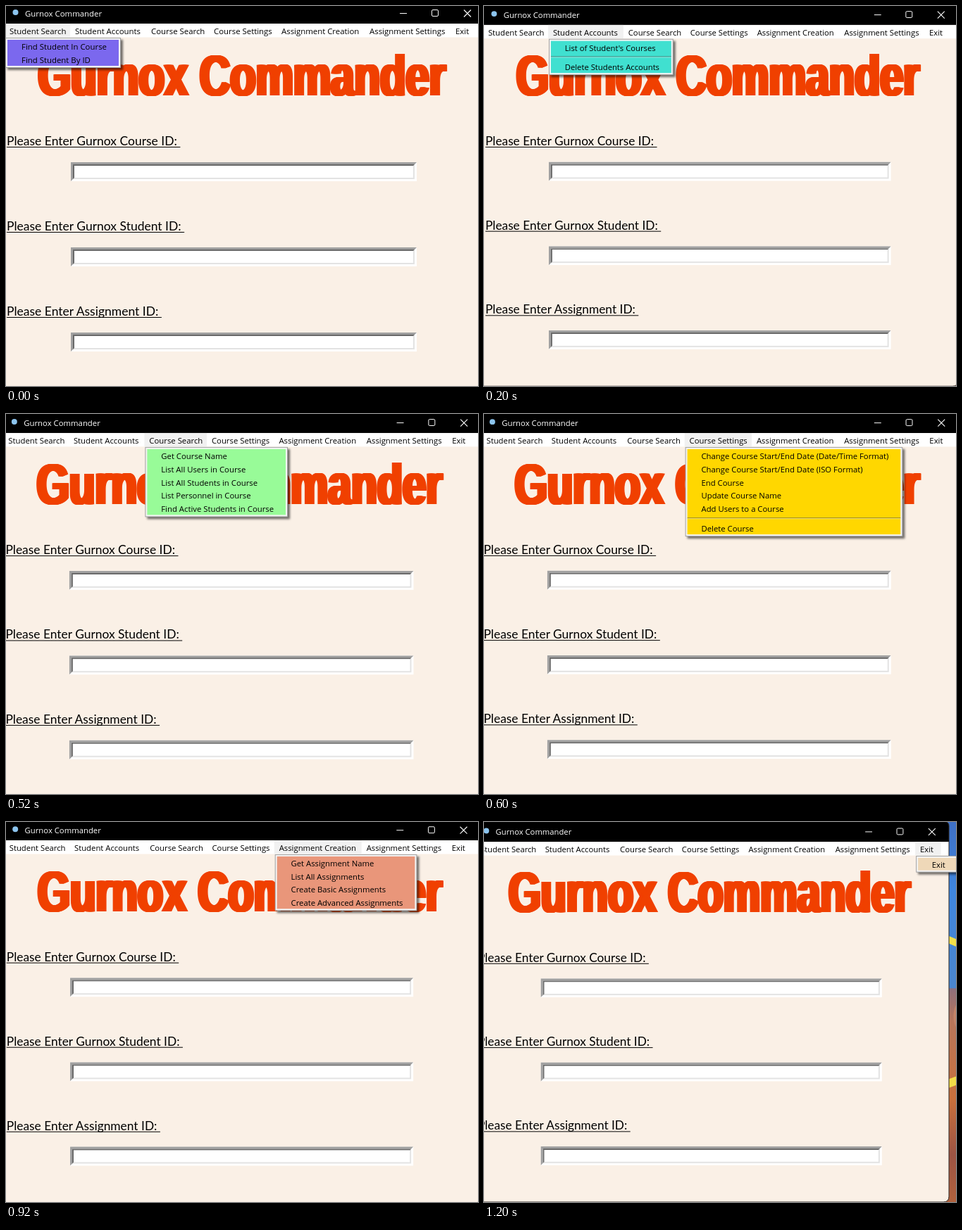
Recreate the animation shown at these times as an HTML page. Size 670 by 540 pixels, loop 1.4 s.

```html
<!DOCTYPE html>
<html lang="en">
<head>
<meta charset="utf-8">
<title>Gurnox Commander</title>
<style>
  html, body { margin: 0; width: 100%; height: 100%; overflow: hidden; background: #faf0e6; }
  svg { display: block; width: 670px; height: 540px; overflow: hidden; }
  text { white-space: pre; }
  .ui { font: 11.4px "Open Sans", "Noto Sans", sans-serif; }
  .label { font: 17.5px Lato, "Open Sans", sans-serif; }
  .headline { font: bold 82px "Liberation Sans", Arial, sans-serif; fill: #f04000; }
  .shadow { filter: drop-shadow(3px 3px 1.5px rgba(0, 0, 0, .55)); }
</style>
</head>
<body>
<svg id="stage" viewBox="0 0 670 540">
  <defs>
    <linearGradient id="sky" x2="0" y2="1">
      <stop offset="0" stop-color="#3f6fc4"/>
      <stop offset=".4" stop-color="#3f86de"/>
      <stop offset="1" stop-color="#4c86cc"/>
    </linearGradient>
    <linearGradient id="ground" x2="0" y2="1">
      <stop offset="0" stop-color="#8e6f7c"/>
      <stop offset=".15" stop-color="#b8765a"/>
      <stop offset=".5" stop-color="#c8703c"/>
      <stop offset=".75" stop-color="#9c5444"/>
      <stop offset="1" stop-color="#b4643c"/>
    </linearGradient>
    <path id="frame" d="M-4-4H673.5q6 0 6 6V536q0 8-8 8H-4z"/>
    <clipPath id="inside"><use href="#frame"/></clipPath>
    <text id="headline" class="headline">Gurnox Commander</text>
  </defs>
</svg>
<script>
const stage = document.getElementById('stage');
const STEP = 200;
const APP = 'Gurnox Commander';

// '-' is a separator line; view is [zoom, x, y] of the camera
const menus = [
  { name: 'Student Search', x: 5, color: '#7b68ee', view: [1, 0, 0],
    items: ['Find Student In Course', 'Find Student By ID'] },
  { name: 'Student Accounts', x: 98, color: '#40e0d0', view: [0.989, 1, 2.2],
    items: ["List of Student's Courses", '-', 'Delete Students Accounts'] },
  { name: 'Course Search', x: 206, color: '#98fb98', view: [0.995, -1.6, 2.1],
    items: ['Get Course Name', 'List All Users in Course', 'List All Students in Course',
      'List Personnel in Course', 'Find Active Students in Course'] },
  { name: 'Course Settings', x: 295, color: '#ffd700', view: [0.9935, -1.5, 2.2],
    items: ['Change Course Start/End Date (Date/Time Format)',
      'Change Course Start/End Date (ISO Format)', 'End Course', 'Update Course Name',
      'Add Users to a Course', '-', 'Delete Course'] },
  { name: 'Assignment Creation', x: 391, color: '#e9967a', view: [0.992, -0.2, 1.3],
    items: ['Get Assignment Name', 'List All Assignments', 'Create Basic Assignments',
      'Create Advanced Assignments'] },
  { name: 'Assignment Settings', x: 516, color: '#cd5c5c', view: [0.986, -37, 3.4],
    items: ['Update Assignement Elements', 'List Ungraded Assignments',
      'Get Students Scores on an Assignment', 'List of Students Grades', '-',
      'Delete Assignment'] },
  { name: 'Exit', x: 638, color: '#efd8b8', view: [0.986, -10, 3.6], items: ['Exit'] }
];

function add(parent, tag, attrs = {}) {
  const node = document.createElementNS('http://www.w3.org/2000/svg', tag);
  for (const key in attrs) node.setAttribute(key, attrs[key]);
  return parent.appendChild(node);
}

const rect = (g, x, y, width, height, fill) =>
  add(g, 'rect', { x, y, width, height, fill });

const line = (g, d, stroke, width = 1) =>
  add(g, 'path', { d, stroke, 'stroke-width': width, fill: 'none' });

function text(g, str, x, y, cls = 'ui', fill = '#000') {
  const node = add(g, 'text', { x, y, class: cls, fill });
  node.textContent = str;
  return node;
}

function bevel(g, x, y, w, h, d, dark, light) {
  rect(g, x, y, w, h, light);
  add(g, 'path', {
    d: `M${x} ${y}h${w}l${-d} ${d}H${x + d}V${y + h - d}l${-d} ${d}z`, fill: dark
  });
}

function addDesktop(g) {
  rect(g, 660, -10, 80, 260, 'url(#sky)');
  rect(g, 660, 236, 80, 320, 'url(#ground)');
  add(g, 'ellipse', { cx: 706, cy: 276, rx: 20, ry: 28, fill: '#c48468' });
  line(g, 'M672 163L725 185', '#f2e04a', 10);
  line(g, 'M672 376L725 356', '#f2dc48', 12);
}

function addTitleBar(g) {
  rect(g, -4, -4, 686, 29, '#000');
  add(g, 'circle', { cx: 13.5, cy: 9, r: 4, fill: '#8cc4ee' });
  text(g, APP, 27, 15, 'ui', '#fff');
  line(g, 'M559 10.5h10', '#fff');
  add(g, 'rect', { x: 604.5, y: 5.5, width: 9, height: 9, rx: 1.5, fill: 'none', stroke: '#fff' });
  line(g, 'M650 5.5l10 10m0-10l-10 10', '#fff', 1.1);
}

function addMenuBar(g, open) {
  rect(g, -4, 25, 686, 19.5, '#fff');
  const next = menus[menus.indexOf(open) + 1];
  const end = next ? next.x - 7 : 668;
  rect(g, open.x - 7, 25, end - open.x + 7, 19.5, '#f1f1f1');
  menus.forEach(m => text(g, m.name, m.x, 40));
}

// Heavy condensed headline: narrow the face, then thicken stems sideways
function addHeadline(g) {
  const face = add(g, 'g', { transform: 'translate(44 126.5) scale(.73 1)' });
  for (let dx = 0; dx <= 8; dx++) add(face, 'use', { href: '#headline', x: dx - 2 });
}

function addField(g, label, y) {
  const width = text(g, label, 1, y, 'label').getComputedTextLength();
  rect(g, 1, y + 2, width, 1, '#000');
  bevel(g, 92, y + 24, 491, 27, 3, '#a0a0a0', '#fff');
  bevel(g, 95, y + 27, 485, 21, 2, '#696969', '#e3e3e3');
  rect(g, 97, y + 29, 481, 17, '#fff');
}

function addWindow(scene, open) {
  const g = add(scene, 'g', { 'clip-path': 'url(#inside)' });
  rect(g, -4, -4, 690, 550, '#faf0e6');
  addTitleBar(g);
  addMenuBar(g, open);
  addHeadline(g);
  ['Gurnox Course', 'Gurnox Student', 'Assignment'].forEach((what, i) =>
    addField(g, `Please Enter ${what} ID: `, 198 + 121 * i));
  add(scene, 'use', { href: '#frame', fill: 'none', stroke: '#2a2624' });
}

function addMenu(scene, { x, color, items }) {
  const box = add(scene, 'g', { class: 'shadow' });
  const list = add(scene, 'g');
  const left = x - 6;
  const lines = [];
  let widest = 0;
  let y = 48;
  for (const item of items) {
    if (item === '-') {
      lines.push(y + 3);
      y += 9;
    } else {
      widest = Math.max(widest, text(list, item, x + 17, y + 14).getComputedTextLength());
      y += 19;
    }
  }
  const width = widest + 43;
  const height = y - 43;
  rect(box, left, 45, width, height, '#a0a0a0');
  rect(box, left + 1, 46, width - 2, height - 2, '#f4f4f4');
  rect(box, left + 3, 48, width - 6, height - 6, color);
  for (const ly of lines) {
    rect(list, left + 3, ly, width - 6, 1, 'rgba(60,60,60,.6)');
    rect(list, left + 3, ly + 1, width - 6, 1, 'rgba(255,255,255,.45)');
  }
}

const scenes = menus.map(open => {
  const [zoom, x, y] = open.view;
  const scene = add(stage, 'g', { transform: `translate(${x} ${y}) scale(${zoom})` });
  addDesktop(scene);
  addWindow(scene, open);
  addMenu(scene, open);
  return scene;
});

const start = performance.now();
function tick() {
  const now = Math.floor((performance.now() - start) / STEP) % scenes.length;
  scenes.forEach((scene, i) => { scene.style.display = i === now ? '' : 'none'; });
  requestAnimationFrame(tick);
}
tick();
</script>
</body>
</html>
```
